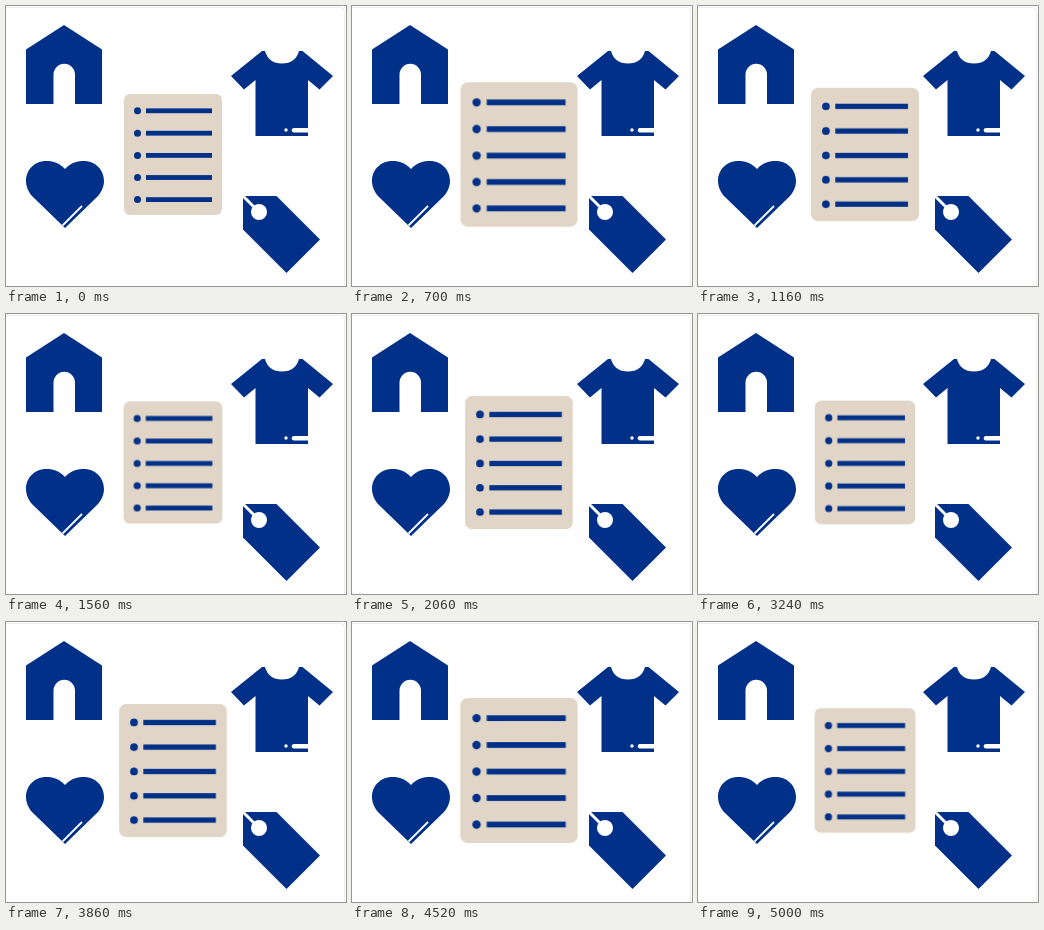
These frames come from a looping animation (340x280 px, 5020 ms). An HTML page without scripts:

```html
<!DOCTYPE html>
<html lang="en">
<head>
<meta charset="utf-8">
<title>Shopping list</title>
<style>
  html, body { margin: 0; width: 100%; height: 100%; overflow: hidden; background: #fff; }
  svg { display: block; width: 340px; height: 280px; }
  .ink { fill: #003087; }
  .gap { fill: #fff; }
  .cut { fill: none; stroke: #fff; }
  .list {
    transform-origin: 167px 148.5px;
    animation: pulse 5.02s infinite;
  }
  /* 900 ms swings; the last one is cut off after 520 ms */
  @keyframes pulse {
    0%, 35.8566%, 71.7131% { transform: scale(1); animation-timing-function: ease; }
    17.9283%, 53.7849% { transform: scale(1.2); animation-timing-function: ease; }
    89.6414% {
      transform: scale(1.2);
      animation-timing-function: cubic-bezier(.3295, .0876, .4081, .7087);
    }
    100% { transform: scale(1.0261); }
  }
</style>
</head>
<body>
<svg viewBox="0 0 340 280">
  <defs>
    <g id="row" class="ink">
      <circle cx="131.5" r="3.5"/>
      <rect x="140" y="-2.4" width="66" height="4.8"/>
    </g>
  </defs>

  <path d="M0 1.5H334.5a4 4 0 0 1 4 4V280" fill="none" stroke="#eee"/>

  <g id="house">
    <path class="ink" d="M58 19L96 43.5V98H20V43.5Z"/>
    <path class="gap" d="M47.5 98.5V68.5a10.75 10.75 0 0 1 21.5 0V98.5Z"/>
  </g>

  <g id="heart">
    <path class="ink" d="M59 163C53 156.500 46 155 40 155C29 155 20 163.500 20 175C20 181 23 187 27 191L59 222L91 191C95 187 98 181 98 175C98 163.500 89 155 78 155C72 155 65 156.500 59 163Z"/>
    <path class="cut" stroke-width="1.8" d="M56.500 219.500L76 200"/>
  </g>

  <g id="shirt">
    <path class="ink" d="M256 45H259C261 53 267 57.500 276 57.500S291 53 293 45H296.500L327 70L313.500 83.500L302 74V130H249.500V74L238 83.500L225 70Z"/>
    <circle class="gap" cx="280" cy="124" r="1.7"/>
    <path class="gap" d="M302.500 122H288a2.250 2.250 0 0 0 0 4.500H302.500Z"/>
  </g>

  <g id="tag">
    <path class="ink" d="M237 190H270.500L314 233.500L280.500 267L237 223.500Z"/>
    <circle class="gap" cx="253" cy="206" r="8"/>
    <path class="cut" stroke-width="3" d="M235.500 188.500L250 203"/>
  </g>

  <g class="list">
    <rect x="118" y="88" width="98" height="121" rx="6" fill="#e0d5c6"/>
    <use href="#row" y="104.8"/>
    <use href="#row" y="127.2"/>
    <use href="#row" y="149.400"/>
    <use href="#row" y="171.500"/>
    <use href="#row" y="193.600"/>
  </g>
</svg>
</body>
</html>
```
